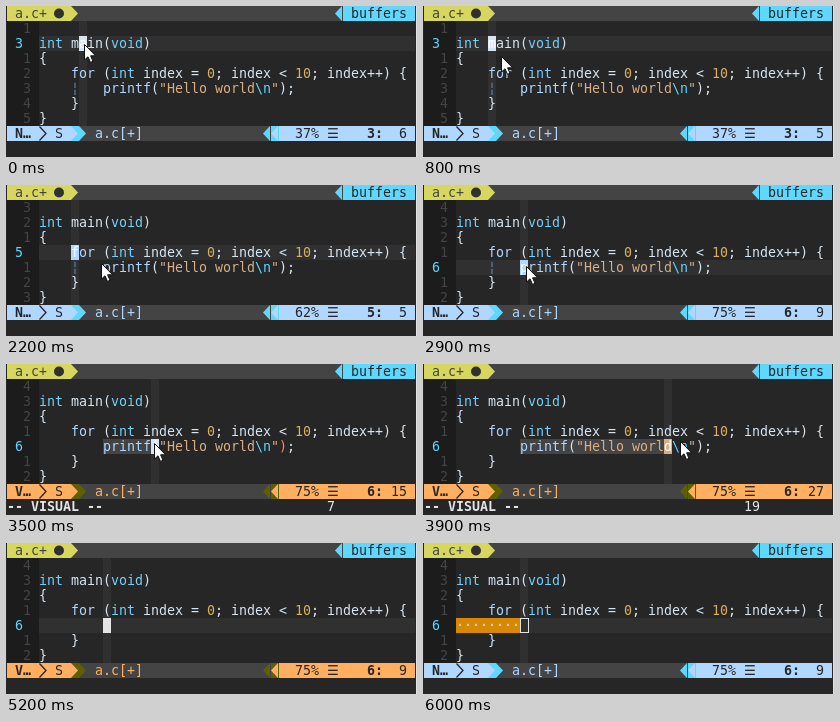
An HTML page for the animation above (6100 ms loop, 411 by 151 pixels).

```html
<!DOCTYPE html>
<html lang="en">
<head>
<meta charset="utf-8">
<title>Mouse selection in a text editor</title>
<style>
html, body { margin: 0; width: 100%; height: 100%; overflow: hidden; background: #262626; }
svg { display: block; }
text { font: 13.29px "DejaVu Sans Mono", "DejaVu Sans", monospace; white-space: pre; }
.b { font-weight: bold; }
</style>
</head>
<body>
<svg id="stage" width="411" height="151" viewBox="0 0 411 151"></svg>
<script>
const LOOP = 6100, STEP = 100, CW = 8, RH = 15, GUTTER = 4;
const C = {
  bg: '#262626', gutter: '#1c1c1c', hi: '#303030', bar: '#444444', dim: '#444444',
  white: '#e4e4e4', code: '#d7e5f2', blue: '#afd7ff', cyan: '#5fd7ff', type: '#74d0fa',
  tan: '#d7af87', number: '#d7af5f', yellow: '#d7d75f', orange: '#ffaf5f', olive: '#5f5f00',
  select: '#444444', trail: '#d78700', match: '#ff875f', ink: '#262626', edge: '#e0e0e0'
};

// Buffer lines by number: [column, text, colour], columns from 0.
const code = {
  3: [[0, 'int', C.type], [4, 'main(', C.code], [9, 'void', C.type], [13, ')', C.code]],
  4: [[0, '{', C.code]],
  5: [[4, 'for', C.blue], [8, '(', C.code], [9, 'int', C.type], [13, 'index =', C.code],
      [21, '0', C.number], [22, '; index <', C.code], [32, '10', C.number], [34, '; index++) {', C.code]],
  6: [[8, 'printf', C.blue], [14, '(', C.code], [15, '"Hello world', C.tan], [27, '\\n', C.cyan],
      [29, '"', C.tan], [30, ');', C.code]],
  7: [[4, '}', C.code]],
  8: [[0, '}', C.code]]
};

// Pointer path: time, x, y.
const path = [
  [0, 78, 38], [100, 65, 37], [500, 65, 37], [800, 78, 50], [1100, 69, 71],
  [1200, 69, 71], [1500, 66, 66], [1700, 66, 66], [2300, 101, 80], [2500, 101, 80],
  [2600, 103, 81], [2900, 103, 81], [3500, 148, 79], [3900, 257, 77], [4100, 286, 72],
  [4200, 286, 72], [4500, 285, 80], [LOOP, 285, 80]
];
const DRAG_LAG = 35, DRAG = 3000, CUT = 5200, STATUS = 5300, TRAIL = 5400, BLUR = 6000;

const px = col => 1 + col * CW;
const esc = s => s.replace(/&/g, '&amp;').replace(/</g, '&lt;');
const rect = (x, y, w, h, fill) => `<rect x="${x}" y="${y}" width="${w}" height="${h}" fill="${fill}"/>`;
const cells = (col, row, n, fill, rows = 1) => rect(px(col), row * RH, n * CW, rows * RH, fill);
const text = (col, row, s, fill, cls = '') =>
  `<text class="${cls}" x="${px(col)}" y="${row * RH + 12}" fill="${fill}">${esc(s)}</text>`;

// The arrow glyphs are one pixel narrower than their cell.
function wedge(col, row, dir, fill) {
  const w = CW - 1, back = px(col) + (dir > 0 ? 0 : w), y = row * RH;
  return `<path d="M${back} ${y}l${dir * w} ${RH / 2}L${back} ${y + RH}Z" fill="${fill}"/>`;
}

function pointerAt(t) {
  const i = path.findIndex((p, n) => n && t < p[0]);
  const [t0, x0, y0] = path[i - 1], [t1, x1, y1] = path[i];
  const u = (t - t0) / (t1 - t0);
  return { x: x0 + (x1 - x0) * u, y: y0 + (y1 - y0) * u };
}

function cursorAt(t) {
  if (t < 300) return { line: 3, col: 5 };
  if (t < 1600) return { line: 3, col: 4 };
  if (t < 2800) return { line: 5, col: 4 };
  if (t < DRAG || t >= CUT) return { line: 6, col: 8 };
  const p = pointerAt(t - DRAG_LAG);
  return { line: Math.floor(p.y / RH) + 1, col: Math.floor((p.x - px(GUTTER)) / CW) };
}

function charAt(line, col) {
  const part = code[line].find(([c, s]) => col >= c && col < c + s.length);
  return part ? { ch: part[1][col - part[0]], fill: part[2] } : { ch: ' ', fill: C.white };
}

function tabline() {
  return cells(0, 0, 51, C.bar) + cells(0, 0, 8, C.yellow) + wedge(8, 0, 1, C.yellow) +
    text(1, 0, 'a.c+', C.bar) + `<circle cx="53" cy="7.5" r="5" fill="${C.hi}"/>` +
    wedge(41, 0, -1, C.cyan) + cells(42, 0, 9, C.cyan) + text(43, 0, 'buffers', C.ink);
}

function statusline(cur, visual) {
  const main = visual ? C.orange : C.blue, sep = visual ? C.olive : C.cyan, row = 8;
  const pct = Math.floor(cur.line / 8 * 100) + '%';
  return cells(0, row, 51, C.bar) +
    cells(0, row, 8, main) + cells(8, row, 1, sep) +
    wedge(8, row, 1, main) + wedge(9, row, 1, sep) +
    text(1, row, visual ? 'V…' : 'N…', C.ink, 'b') +
    `<path d="M33.5 120.5l6.5 7l-6.5 7" fill="none" stroke="${C.ink}" stroke-width="1.3"/>` +
    text(6, row, 'S', C.ink) + text(11, row, 'a.c[+]', main) +
    wedge(32, row, -1, sep) + cells(33, row, 1, sep) + wedge(33, row, -1, main) +
    cells(34, row, 17, main) + text(36, row, pct, C.ink) + text(40, row, '☰', C.ink) +
    text(45, row, cur.line + ':', C.ink, 'b') +
    text(47, row, String(cur.col + 1).padStart(3), C.ink);
}

function selection(cur) {
  if (cur.line === 6) return cells(GUTTER + 8, 5, cur.col - 8, C.select);
  return cells(GUTTER + cur.col, 4, Math.max(0, 46 - cur.col), C.select) + cells(GUTTER, 5, 9, C.select);
}

function buffer(t, cur, visual) {
  const cut = t >= CUT, trail = t >= TRAIL, row = cur.line - 1;
  let s = cells(0, 1, GUTTER, C.gutter, 7) + cells(GUTTER + cur.col, 1, 1, C.hi, 7);
  if (visual) s += selection(cur);
  else s += cells(GUTTER, row, 47, C.hi);
  if (trail) s += cells(GUTTER, 5, 8, C.trail) + text(GUTTER, 5, '·'.repeat(8), C.white);

  for (let line = 2; line <= 8; line++) {
    const here = line === cur.line;
    s += here ? text(1, line - 1, String(line), C.cyan)
              : text(2, line - 1, String(Math.abs(line - cur.line)), C.dim);
    if (line === 6 && cut) continue;
    for (const [c, str, fill] of code[line] || []) s += text(GUTTER + c, line - 1, str, fill);
  }
  if (!cut && !(visual && cur.line === 6)) s += text(GUTTER + 4, 5, '¦', '#5f87af');

  // Bracket partner of the cursor
  if (visual && cur.line === 6 && cur.col === 14) {
    s += cells(GUTTER + 30, 5, 1, C.bg) + text(GUTTER + 30, 5, ')', C.match);
  }

  const col = GUTTER + cur.col;
  if (t >= BLUR) {
    return s + `<rect x="${px(col) + .5}" y="${row * RH + .5}" width="8" height="14" fill="none" stroke="${C.white}"/>`;
  }
  const { ch, fill } = cut ? { ch: ' ', fill: C.white } : charAt(cur.line, cur.col);
  return s + cells(col, row, 1, fill) + text(col, row, ch, '#ffffff');
}

function commandline(cur) {
  const count = cur.line === 6 ? cur.col - 7 : 2;
  return text(0, 9, '-- VISUAL --', C.white, 'b') + text(40, 9, String(count), C.white);
}

function pointer(t) {
  const { x, y } = pointerAt(t);
  return `<path transform="translate(${Math.round(x)} ${Math.round(y)})" ` +
    'd="M.5 .5V16L4 12.8L6.5 18.4L9 17.3L6.6 11.8H11.6Z" fill="#fff" stroke="#111"/>';
}

const stage = document.getElementById('stage');
function draw(t) {
  const cur = cursorAt(t);
  const visual = t >= DRAG && t < CUT;
  stage.innerHTML = rect(0, 0, 411, 151, C.bg) + tabline() + buffer(t, cur, visual) +
    statusline(cur, t >= DRAG && t < STATUS) +
    (visual ? commandline(cur) : '') + (t < CUT ? pointer(t) : '') +
    rect(410, 0, 1, 151, C.edge);
}

const start = performance.now();
let last = -1;
function tick() {
  const t = Math.floor((performance.now() - start) % LOOP / STEP) * STEP;
  if (t !== last) draw(last = t);
  requestAnimationFrame(tick);
}
tick();
</script>
</body>
</html>
```
